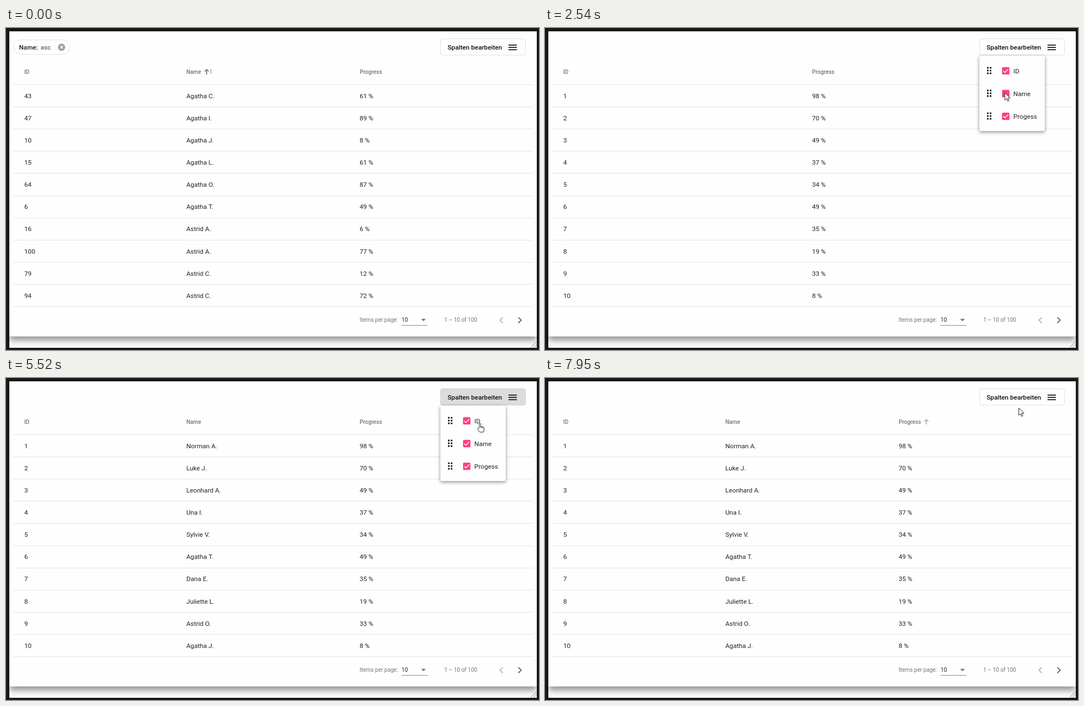
Animation of 962x582 px, one loop 8000 ms. Source, as an HTML page with a canvas:

```html
<!DOCTYPE html>
<html lang="de">
<head>
<meta charset="utf-8">
<title>Spalten bearbeiten</title>
<style>
  html, body { margin: 0; width: 100%; height: 100%; overflow: hidden; background: #18171a; }
  canvas { display: block; width: 962px; height: 582px; }
</style>
</head>
<body>
<canvas id="stage" width="962" height="582"></canvas>
<script>
const ctx = document.getElementById('stage').getContext('2d');
const LOOP = 8000;
const INK = 'rgba(0,0,0,.87)', MUTED = 'rgba(0,0,0,.54)', LINE = 'rgba(0,0,0,.12)';
const PINK = '#ff4081', PAPER = '#fefefe';
const BODY = 11.7, SMALL = 10.03;

const parse = s => s.split('|').map(r => r.split(','));
const sorted = parse('43,Agatha C.,61|47,Agatha I.,89|10,Agatha J.,8|15,Agatha L.,61|64,Agatha O.,87|' +
  '6,Agatha T.,49|16,Astrid A.,6|100,Astrid A.,77|79,Astrid C.,12|94,Astrid C.,72');
const plain = parse('1,Norman A.,98|2,Luke J.,70|3,Leonhard A.,49|4,Una I.,37|5,Sylvie V.,34|' +
  '6,Agatha T.,49|7,Dana E.,35|8,Juliette L.,19|9,Astrid O.,33|10,Agatha J.,8');
const titles = ['ID', 'Name', 'Progress'];

// Moments at which a column is toggled
const NAME_OFF = 2538, NAME_ON = 4090, PROG_OFF = 5920, PROG_ON = 7560;
const menus = [[944, 2575], [3308, 4165], [5315, 5965], [6815, 7605]];
const ripples = [[916, 848, 38], [3286, 880, 36], [5290, 872, 33], [6790, 862, 36]];
const path = [
  [200, 686, 537], [880, 848, 38], [1080, 848, 38], [1790, 840, 121], [2000, 830, 117],
  [2620, 830, 117], [3150, 880, 37], [3290, 880, 37], [3350, 872, 66], [3750, 830, 117],
  [4130, 830, 117], [4520, 868, 34], [4600, 868, 34], [4820, 880, 27], [5050, 880, 27],
  [5130, 878, 17], [5270, 872, 33], [5350, 872, 33], [5750, 830, 158], [5960, 830, 158],
  [6270, 848, 104], [6620, 862, 48], [6740, 862, 36], [6860, 862, 36], [7350, 830, 158],
  [7600, 830, 158], [7930, 855, 54]
];

const icons = {
  left: new Path2D('M15.41 7.41L14 6l-6 6 6 6 1.41-1.41L10.83 12z'),
  right: new Path2D('M10 6L8.59 7.41 13.17 12l-4.58 4.59L10 18l6-6z'),
  arrow: new Path2D('M0 0V13.4L3.1 10.6L5.2 15.3L7.3 14.4L5.3 9.8H9.6Z'),
  hand: new Path2D('M-1.4 8.2V1.2a1.3 1.3 0 0 1 2.6 0V5.6l4.6 1.1c1 .3 1.5.9 1.5 1.9v3.2L6 15.8H-.4l-3.9-5.3c-.7-1 .5-2.1 1.5-1.4z')
};

const clamp = v => Math.max(0, Math.min(1, v));

// cubic-bezier(0, 0, .2, 1)
function decelerate(x) {
  let lo = 0, hi = 1;
  for (let i = 0; i < 20; i++) {
    const s = (lo + hi) / 2;
    if (.6 * s * s + .4 * s ** 3 < x) lo = s; else hi = s;
  }
  return 3 * lo * lo - 2 * lo ** 3;
}

function text(str, x, mid, size = BODY, color = INK, weight = 400) {
  ctx.font = `${weight} ${size}px Roboto, sans-serif`;
  ctx.fillStyle = color;
  ctx.fillText(str, x, mid + size * .355);
}

function rect(x, y, w, h, color) {
  ctx.fillStyle = color;
  ctx.fillRect(x, y, w, h);
}

function rounded(x, y, w, h, r) {
  ctx.beginPath();
  ctx.roundRect(x, y, w, h, r);
}

function disc(x, y, r, color) {
  ctx.beginPath();
  ctx.arc(x, y, r, 0, Math.PI * 2);
  ctx.fillStyle = color;
  ctx.fill();
}

function stroke(points, color, width) {
  ctx.beginPath();
  points.forEach(([x, y]) => ctx.lineTo(x, y));
  ctx.strokeStyle = color;
  ctx.lineWidth = width;
  ctx.stroke();
}

function icon(shape, x, y, scale, color) {
  ctx.save();
  ctx.translate(x, y);
  ctx.scale(scale, scale);
  ctx.fillStyle = color;
  ctx.fill(shape);
  ctx.restore();
}

function shadow(color, blur, dy) {
  ctx.shadowColor = color;
  ctx.shadowBlur = blur;
  ctx.shadowOffsetY = dy;
}

function cursorAt(t) {
  let i = path.findIndex(p => p[0] > t);
  if (i < 0) i = path.length;
  const a = path[i - 1], b = path[i] || a;
  const k = a === b ? 0 : (t - a[0]) / (b[0] - a[0]);
  const e = k * k * (3 - 2 * k);
  return { x: a[1] + (b[1] - a[1]) * e, y: a[2] + (b[2] - a[2]) * e };
}

function menuAt(t) {
  const m = menus.find(([open, close]) => t >= open && t < close + 100);
  if (!m) return null;
  const p = decelerate(clamp((t - m[0]) / 120));
  return { scale: .8 + .2 * p, alpha: p * (1 - clamp((t - m[1]) / 100)), ready: t > m[0] + 120 && t < m[1] };
}

function drawCard() {
  rect(0, 0, 962, 582, '#18171a');
  ctx.save();
  ctx.beginPath();
  ctx.rect(6, 6, 952, 572);
  ctx.clip();
  rect(6, 6, 952, 572, PAPER);
  shadow('rgba(0,0,0,.46)', 12, 6);
  rect(6, 0, 952, 557.5, PAPER);
  ctx.restore();
  stroke([[947, 577.5], [957.5, 567]], '#777', 1);
  stroke([[952.5, 577.5], [957.5, 572.5]], '#777', 1);
}

function drawSortArrow(x, color) {
  stroke([[x, 84], [x, 75]], color, 1.7);
  stroke([[x - 3.7, 78.7], [x, 75], [x + 3.7, 78.7]], color, 1.6);
}

function drawChip() {
  rounded(13.5, 21.5, 102, 26, 13);
  ctx.strokeStyle = '#e2e2e2';
  ctx.lineWidth = 1;
  ctx.stroke();
  text('Name:', 23.5, 35, BODY, INK, 500);
  text('asc', 62.5, 35, BODY, 'rgba(0,0,0,.6)', 500);
  disc(100.3, 34.8, 6.5, '#9e9e9e');
  for (const d of [-2.4, 2.4]) stroke([[100.3 - d, 32.4], [100.3 + d, 37.2]], '#fff', 1.5);
}

function drawTable(t) {
  const isSorted = t < NAME_OFF;
  const cols = t < NAME_OFF ? [0, 1, 2] : t < NAME_ON ? [0, 2] : t < PROG_OFF ? [0, 1, 2] : t < PROG_ON ? [0, 1] : [0, 1, 2];
  const xs = cols.length === 3 ? [33, 325.5, 638.3] : [33, 482];
  cols.forEach((c, i) => {
    text(titles[c], xs[i], 79, SMALL, MUTED, 500);
    (isSorted ? sorted : plain).forEach((row, r) =>
      text(row[c] + (c === 2 ? ' %' : ''), xs[i], 122.6 + r * 40.12));
  });
  for (let i = 0; i < 11; i++) rect(13, Math.round(102 + i * 40.12), 938, 1, 'rgba(0,0,0,.1)');
  if (isSorted) {
    drawChip();
    drawSortArrow(362.2, '#757575');
    text('1', 367, 79, SMALL, MUTED);
  }
  if (t >= PROG_ON) drawSortArrow(688.3, '#b0b0b0');
}

function drawPaginator() {
  text('Items per page:', 638.3, 527.8, SMALL, MUTED);
  text('10', 714, 527.8, SMALL, INK);
  rect(714, 537, 47, 1, 'rgba(0,0,0,.45)');
  ctx.beginPath();
  ctx.moveTo(749.2, 525.7);
  ctx.lineTo(757.8, 525.7);
  ctx.lineTo(753.5, 530);
  ctx.fillStyle = MUTED;
  ctx.fill();
  text('1 – 10 of 100', 791, 527.3, SMALL, MUTED);
  icon(icons.left, 882.4, 516.4, .975, 'rgba(0,0,0,.27)');
  icon(icons.right, 915.6, 516.4, .975, 'rgba(0,0,0,.58)');
}

function drawButton(t, over) {
  const rip = ripples.find(r => t >= r[0] && t < r[0] + 375);
  ctx.save();
  rounded(784.5, 19.5, 153, 29.5, 3.3);
  ctx.fillStyle = PAPER;
  ctx.fill();
  ctx.clip();
  if (over || rip) rect(784, 19, 154, 31, 'rgba(0,0,0,.025)');
  if (rip) {
    const [down, x, y] = rip;
    const full = Math.hypot(Math.max(x - 784, 938 - x), Math.max(y - 19, 49 - y));
    const fade = 1 - clamp((t - down - 225) / 150);
    disc(x, y, full * decelerate(clamp((t - down) / 225)), `rgba(0,0,0,${.12 * fade})`);
  }
  ctx.restore();
  rounded(784.5, 19.5, 153, 29.5, 3.3);
  ctx.strokeStyle = LINE;
  ctx.lineWidth = 1;
  ctx.stroke();
  text('Spalten bearbeiten', 797, 34.6, BODY, '#111', 500);
  for (const y of [30, 34.2, 38.4]) rect(907, y, 15, 1.7, '#111');
}

function drawCheckbox(x, y, fill, ticked) {
  if (fill < 1) {
    ctx.strokeStyle = MUTED;
    ctx.lineWidth = 1.7;
    rounded(x + .85, y + .85, 11.7, 11.7, .8);
    ctx.stroke();
  }
  if (fill > 0) {
    ctx.save();
    ctx.globalAlpha *= fill;
    ctx.fillStyle = PINK;
    rounded(x, y, 13.4, 13.4, 1.7);
    ctx.fill();
    ctx.restore();
  }
  if (ticked) stroke([[x + 2.3, y + 6.8], [x + 5.2, y + 9.7], [x + 11.3, y + 3.5]], '#fff', 1.4);
}

function drawMenu(t, menu) {
  ctx.save();
  ctx.globalAlpha = menu.alpha;
  ctx.translate(784, 50);
  ctx.scale(menu.scale, menu.scale);
  ctx.save();
  shadow('rgba(0,0,0,.45)', 6, 2);
  rounded(0, 0, 118, 136.3, 3.3);
  ctx.fillStyle = PAPER;
  ctx.fill();
  ctx.restore();
  const toggles = [null, [NAME_OFF, NAME_ON], [PROG_OFF, PROG_ON]];
  ['ID', 'Name', 'Progess'].forEach((label, i) => {
    const y = 27.4 + i * 41.1;
    for (let d = 0; d < 6; d++) disc(15.2 + d % 2 * 5, y - 5.5 + (d >> 1) * 5, 1.65, '#111');
    const [off, on] = toggles[i] || [LOOP, LOOP];
    const fill = t < off ? 1 : t < on ? 1 - clamp((t - off - 8) / 90) : clamp((t - on) / 90);
    drawCheckbox(40.9, y - 6.7, fill, t < off || t >= on);
    text(label, 61.3, y + .5);
  });
  ctx.restore();
}

function drawCursor({ x, y }, hand) {
  ctx.save();
  ctx.translate(x, y);
  ctx.lineJoin = 'round';
  ctx.lineWidth = 1;
  ctx.strokeStyle = '#222';
  ctx.fillStyle = '#fff';
  const shape = hand ? icons.hand : icons.arrow;
  ctx.fill(shape);
  ctx.stroke(shape);
  if (hand) for (const k of [1.2, 3.3, 5.3]) stroke([[k, 6], [k, 8.6]], '#222', .8);
  ctx.restore();
}

function draw(t) {
  const menu = menuAt(t);
  const cursor = t >= 200 ? cursorAt(t) : null;
  const over = cursor && !menu && cursor.x > 784 && cursor.x < 938 && cursor.y > 15 && cursor.y < 49;
  const onItem = menu && menu.ready && cursor.y > 56 && !(t >= 2330 && t < 2700);
  drawCard();
  drawTable(t);
  drawPaginator();
  drawButton(t, over);
  if (menu) drawMenu(t, menu);
  if (cursor) drawCursor(cursor, over || onItem);
}

const start = performance.now();
function tick() {
  draw((performance.now() - start) % LOOP);
  requestAnimationFrame(tick);
}
tick();
</script>
</body>
</html>
```
